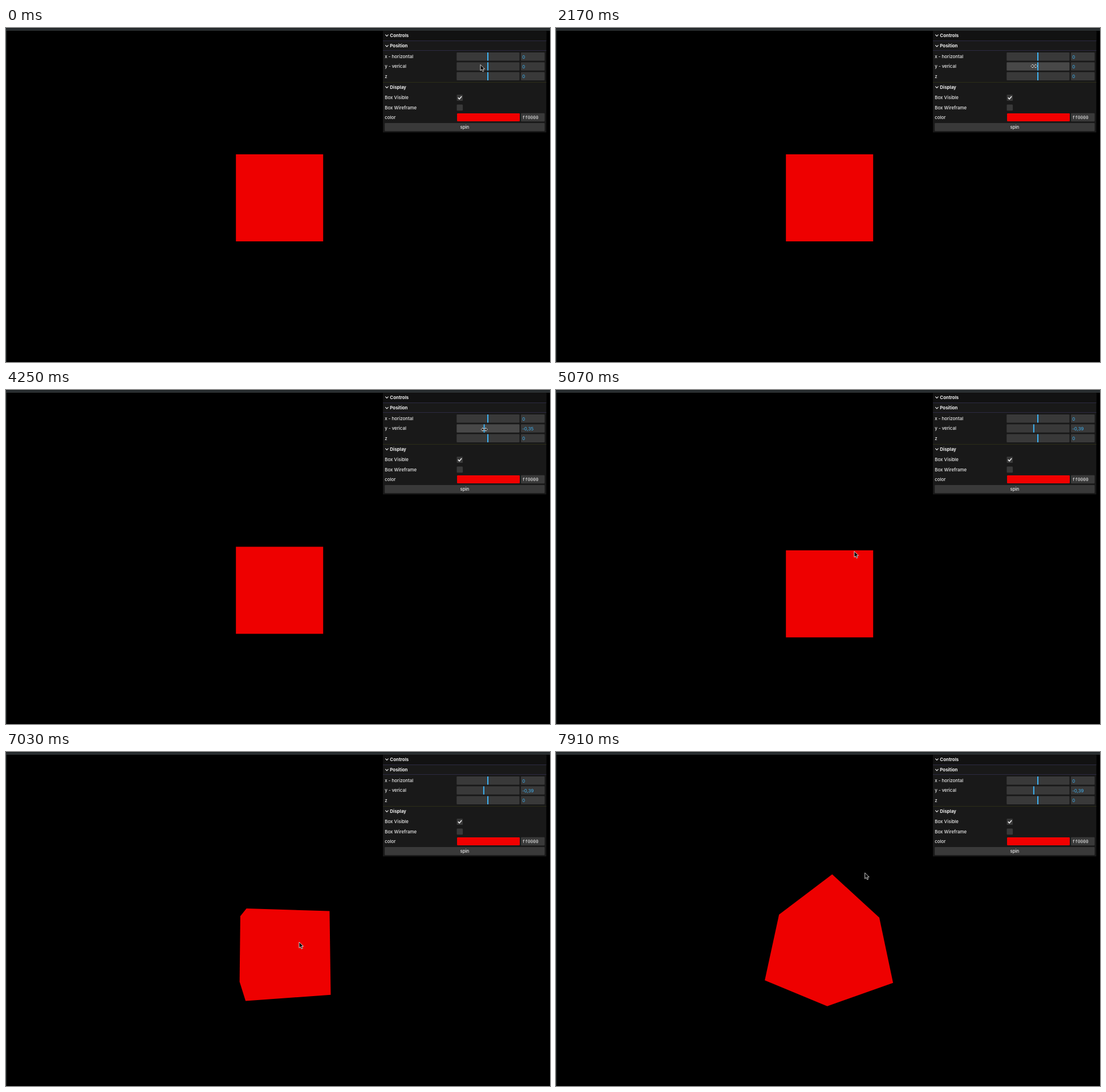
An HTML page that plays this animation: 954x587 px, repeating every 8000 ms.

```html
<!DOCTYPE html>
<html lang="en">
<head>
<meta charset="utf-8">
<title>Box controls</title>
<style>
  html, body { margin: 0; width: 100%; height: 100%; overflow: hidden; background: #000; }
  svg { display: block; }
  text { font: 500 7.9px Inter, Roboto, sans-serif; fill: #ececec; }
  .head { font-weight: 700; }
  .num { font-weight: 400; fill: #3fb2f2; }
  .mono { font: 7.9px "DejaVu Sans Mono", monospace; }
  .widget { fill: #393939; }
  .hover { fill: #484848; }
  .knob { fill: #3fb2f2; }
  .swatch { fill: #f20000; }
  .rule { fill: #2d2a42; }
  .chevron, .tick { fill: none; stroke: #ececec; stroke-linecap: round; stroke-linejoin: round; }
  .chevron { stroke-width: 1.1; }
  .tick { stroke-width: 1.6; }
  .pointer { fill: #000; stroke: #e8e8e8; stroke-width: .9; stroke-linejoin: round; }
</style>
</head>
<body>
<svg width="954" height="587" viewBox="0 0 954 587">
  <rect width="954" height="587"/>
  <rect width="1.4" height="587" fill="#1e2324"/>
  <rect width="954" height="3" fill="#23282a"/>
  <rect y="3" width="954" height="1.5" fill="#393e40"/>
  <polygon id="box" fill="#ee0000"/>
  <g id="panel">
    <rect x="661" y="5" width="286.5" height="178.5" fill="#191919"/>
    <rect x="661" y="5" width="286.5" height="17" fill="#121212"/>
    <rect class="rule" x="661" y="22" width="286.5" height="1"/>
    <rect class="rule" x="661" y="39" width="286.5" height="1"/>
    <rect x="661" y="95" width="286.5" height="1" fill="#2c2d18"/>
  </g>
  <path id="arrow" class="pointer" d="M0 0V10.4L2.4 8.2L4 12L5.9 11.2L4.3 7.5H7.5Z"/>
  <path id="resize" class="pointer" d="M-5.6 0L-2.4-3V-1H2.4V-3L5.6 0L2.4 3V1H-2.4V3Z"/>
</svg>
<script>
const LOOP = 8000;
const ROW = 17.3;
const KNOB_X = 844;
const $ = id => document.getElementById(id);

function add(tag, attrs, text = '') {
  const el = document.createElementNS('http://www.w3.org/2000/svg', tag);
  for (const k in attrs) el.setAttribute(k, attrs[k]);
  el.textContent = text;
  return $('panel').appendChild(el);
}
const rect = (x, y, width, height, cls = 'widget') =>
  add('rect', { x, y, width, height, rx: 1.2, class: cls });
const label = (x, y, text, cls = '') => add('text', { x, y, class: cls }, text);

function heading(y, text) {
  add('path', { class: 'chevron', d: `M665.6 ${y - 3.9}l2.3 2.4l2.3-2.4` });
  label(673.3, y, text, 'head');
}
function slider(name, i) {
  const y = 43 + i * ROW;
  label(664.3, y + 10, name);
  const track = rect(790.3, y, 110.2, 14.4);
  const knob = add('rect', { x: KNOB_X, y, width: 2, height: 14.4, class: 'knob' });
  rect(903, y, 41.6, 14.4);
  return { track, knob, value: label(905.2, y + 10.6, '0', 'num') };
}
function checkbox(name, i) {
  const y = 117.3 + i * ROW;
  label(664.3, y + 7.9, name);
  rect(790.5, y, 10.6, 10.6);
}

heading(15.8, 'Controls');
heading(34.3, 'Position');
const sliders = ['x - horizontal', 'y - verical', 'z'].map(slider);
heading(106.8, 'Display');
['Box Visible', 'Box Wireframe'].forEach(checkbox);
add('path', { class: 'tick', d: 'M793.2 122.9l1.9 2l3.6-4.4' });
label(664.3, 159.6, 'color');
rect(791, 150, 110, 14, 'swatch');
rect(903, 149.8, 41.6, 14.4);
label(905.2, 159.8, 'ff0000', 'mono');
rect(664.2, 167, 280.4, 14.2);
label(804.4, 176.6, 'spin').setAttribute('text-anchor', 'middle');

const progress = (t, from, to) => Math.min(1, Math.max(0, (t - from) / (to - from)));
const smooth = p => p * p * (3 - 2 * p);

// Pointer moves: start, end, then the place reached
const moves = [
  [60, 770, 838, 66],
  [1890, 2690, 839.5, 69.3],
  [3950, 4500, 838, 69.3],
  [4690, 5070, 523, 283.5],
  [5100, 5910, 473, 341.3],
  [6470, 7030, 514, 334],
  [7030, 7910, 541.7, 212.3]
];
function pointerAt(t) {
  let x = 832, y = 64.5;
  for (const [from, to, toX, toY] of moves) {
    const p = smooth(progress(t, from, to));
    x += (toX - x) * p;
    y += (toY - y) * p;
  }
  return [x, y];
}

// Pressing the slider jumps to the pointer, dragging does the rest
const liftAt = t => t < 3950 ? 0 : Math.round(-30 - 9 * progress(t, 3950, 4500)) / 100;

// Degrees around the box and below it; the tilt starts slower than the turn
function orbitAt(t) {
  const p = progress(t, 6400, 7910);
  return [47.5 * p ** 1.4, 42.2 * p ** 2.85];
}

function hull(points) {
  points.sort((a, b) => a[0] - b[0] || a[1] - b[1]);
  const side = list => {
    const out = [];
    for (const p of list) {
      while (out.length > 1) {
        const [a, b] = out.slice(-2);
        if ((b[0] - a[0]) * (p[1] - a[1]) - (b[1] - a[1]) * (p[0] - a[0]) > 0) break;
        out.pop();
      }
      out.push(p);
    }
    return out.slice(0, -1);
  };
  return [...side(points), ...side([...points].reverse())];
}

// Unit cube seen by a 75 degree camera that orbits the origin at distance 3
function outline(lift, turn, tilt) {
  const rad = Math.PI / 180, focal = 382.5;
  const st = Math.sin(turn * rad), ct = Math.cos(turn * rad);
  const se = Math.sin(tilt * rad), ce = Math.cos(tilt * rad);
  const ends = [-.5, .5], points = [];
  for (const x of ends) for (const y of ends) for (const z of ends) {
    const h = y + lift, near = z * ct - x * st;
    const scale = focal / (3 - near * ce + h * se);
    points.push([479.7 + (x * ct + z * st) * scale, 298.5 - (h * ce + near * se) * scale]);
  }
  return hull(points).map(p => p.map(v => v.toFixed(2)).join()).join(' ');
}

function draw(t) {
  const lift = liftAt(t);
  $('box').setAttribute('points', outline(lift, ...orbitAt(t)));

  const { track, knob, value } = sliders[1];
  const hovered = t >= 1890 && t < 4740;
  track.setAttribute('class', hovered ? 'hover' : 'widget');
  knob.setAttribute('x', KNOB_X + lift * 110 / 6);
  value.textContent = String(lift).replace('.', ',');

  const place = `translate(${pointerAt(t).join(' ')})`;
  for (const id of ['arrow', 'resize']) {
    $(id).setAttribute('transform', place);
    $(id).setAttribute('visibility', (id === 'resize') === hovered ? 'visible' : 'hidden');
  }
}

const start = performance.now();
function tick() {
  draw((performance.now() - start) % LOOP);
  requestAnimationFrame(tick);
}
tick();
</script>
</body>
</html>
```
